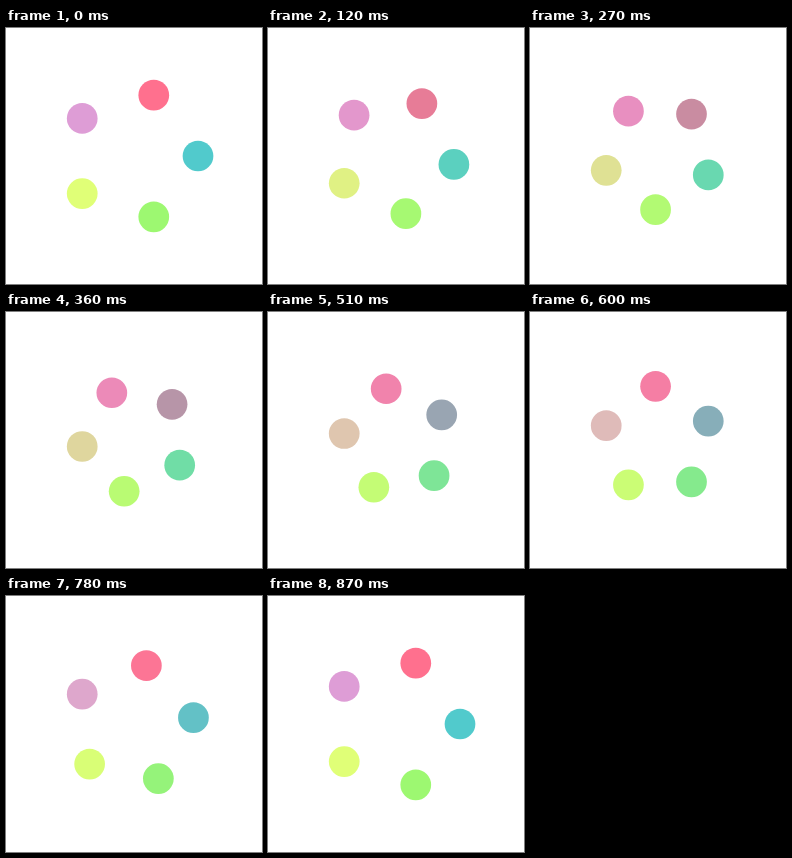
An HTML page that plays this animation: 256x256 px, repeating every 0.9 s.

```html
<!DOCTYPE html>
<html lang="en">
<head>
<meta charset="utf-8">
<title>Pentagon loader</title>
<style>
  html, body { margin: 0; width: 100%; height: 100%; overflow: hidden; background: #fff; }
  svg { display: block; width: 100%; height: 100%; }
</style>
</head>
<body>
<svg id="stage" viewBox="0 0 256 256"></svg>
<script>
const STEP = 30, STEPS = 30, CENTER = 128, ORBIT = 64, RADIUS = 15.36;

// Corner colours, clockwise from the right
const colors = [
  [0x51, 0xca, 0xcc],
  [0x9d, 0xf8, 0x71],
  [0xe0, 0xff, 0x77],
  [0xde, 0x9d, 0xd6],
  [0xff, 0x70, 0x8e]
];
const corners = colors.map((rgb, i) => {
  const a = i * 2 * Math.PI / colors.length;
  return { pos: [CENTER + ORBIT * Math.cos(a), CENTER + ORBIT * Math.sin(a)], rgb };
});

const stage = document.getElementById('stage');
const dots = corners.map(() => {
  const dot = document.createElementNS('http://www.w3.org/2000/svg', 'circle');
  dot.setAttribute('r', RADIUS);
  return stage.appendChild(dot);
});

const mix = (a, b, p) => a.map((v, i) => v + (b[i] - v) * p);

function draw(ms) {
  const p = Math.floor(ms / STEP) % STEPS / (STEPS - 1);
  dots.forEach((dot, i) => {
    const from = corners[i], to = corners[(i + 1) % corners.length];
    const [x, y] = mix(from.pos, to.pos, p);
    dot.setAttribute('cx', x);
    dot.setAttribute('cy', y);
    dot.setAttribute('fill', `rgb(${mix(from.rgb, to.rgb, p).map(Math.round)})`);
  });
}

let start;
function tick(now) {
  start ??= now;
  draw(Math.max(0, now - start));
  requestAnimationFrame(tick);
}
draw(0);
requestAnimationFrame(tick);
</script>
</body>
</html>
```
